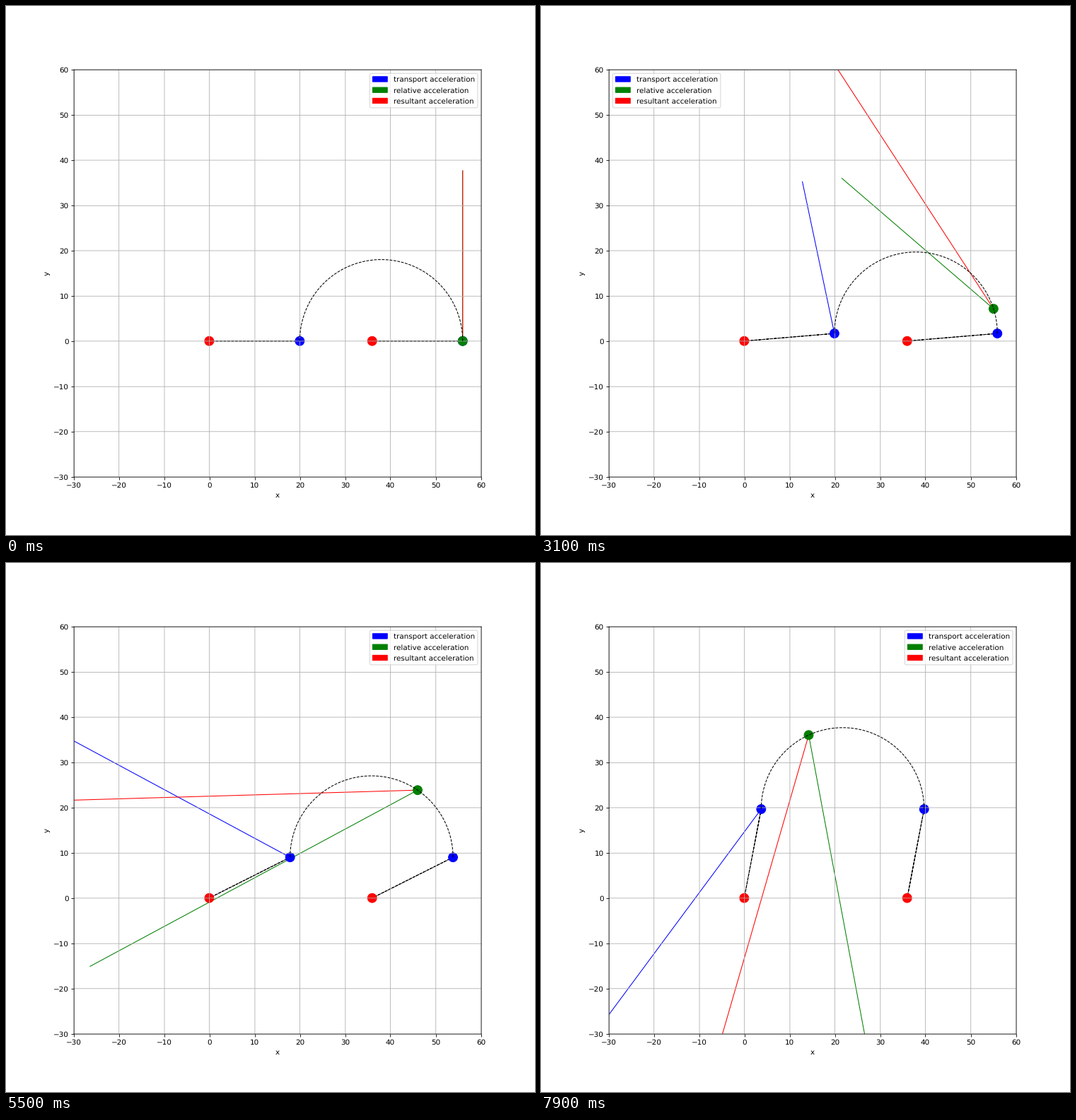
Recreate the animation shown at these times as a matplotlib script. Size 748 by 748 pixels, loop 8000 ms.

```python
import numpy as np
import matplotlib.pyplot as plt
from matplotlib.animation import FuncAnimation
from matplotlib.patches import Circle, Patch

plt.rcParams.update({"path.snap": False, "text.hinting": "none"})

CRANK, R, GAP = 20, 18, 36
FRAMES = 80
DT = np.sqrt(3) / 99

# Axes box in thousandths of the figure, measured from the top left
LEFT, BOTTOM, SIDE = 127.5, 890, 770
UNIT = SIDE / 90


def cell_center(v):
    return np.floor(v + 0.5 + 1e-6) + 0.5


# Grid lines sit on the cell centres of a 1000 by 1000 raster
ticks = np.arange(-30, 61, 10)
grid_x = (cell_center(LEFT + UNIT * (ticks + 30)) - LEFT) / UNIT - 30
grid_y = (BOTTOM - cell_center(BOTTOM - UNIT * (ticks + 30))) / UNIT - 30
names = [f"{v}".replace("-", "\u2212") for v in ticks]

fig = plt.figure(figsize=(10, 10), dpi=74.8)
ax = fig.add_axes([cell_center(LEFT) / 1000, 1 - cell_center(BOTTOM) / 1000,
                   SIDE / 1000, SIDE / 1000])
ax.set_xticks(grid_x, names)
ax.set_yticks(grid_y, names)
ax.set(xlim=grid_x[[0, -1]], ylim=grid_y[[0, -1]], xlabel="x", ylabel="y")
ax.grid(True)


def line(color, style="-", zorder=1):
    return ax.plot([], [], color=color, ls=style, lw=1, zorder=zorder,
                   solid_capstyle="butt")[0]


def dot(x, color):
    return ax.add_patch(Circle((x, 0), 1, color=color))


vectors = {
    "transport": line("blue"),
    "relative": line("green"),
    "resultant": line("red"),
}
cranks = [line("black", "--") for _ in range(2)]
arc = line("black", "--", zorder=2)
pivots = [dot(x, "red") for x in (0, GAP)]
pins = [dot(x, "blue") for x in (0, GAP)]
slider = dot(0, "green")
legend = ax.legend(
    handles=[Patch(color=v.get_color(), label=f"{name} acceleration")
             for name, v in vectors.items()],
    loc="upper right", labelspacing=0.54)
sweep = np.linspace(0, np.pi, 100)


def polar(angle):
    """Radial and tangential unit vectors."""
    c, s = np.cos(angle), np.sin(angle)
    return np.array([c, s]), np.array([-s, c])


def connect(artist, *points):
    artist.set_data(*np.transpose(points))


def legend_loc(i):
    """Keep the legend clear of the vectors' bounding boxes."""
    if i < 12 or i >= 49:
        return "upper right"
    return "upper left" if i < 37 else "lower left"


def update(i):
    t = i * DT

    # Crank angle pi t^3 / 6, arc length 6 pi t^2
    rad, tan = polar(np.pi * t**3 / 6)
    a = CRANK * rad
    transport = CRANK * (np.pi * t * tan - (np.pi * t**2 / 2) ** 2 * rad)

    rad, tan = polar(6 * np.pi * t**2 / R)
    mid = a + [R, 0]
    m = mid + R * rad
    relative = 12 * np.pi * tan - (12 * np.pi * t) ** 2 / R * rad

    connect(vectors["transport"], a, a + transport)
    connect(vectors["relative"], m, m + relative)
    connect(vectors["resultant"], m, m + transport + relative)

    # Each crank's dashes run out and back
    for crank, pin, x in zip(cranks, pins, (0, GAP)):
        pivot, end = np.array([x, 0]), a + [x, 0]
        connect(crank, end, pivot, end)
        pin.set_center(end)
    slider.set_center(m)
    arc.set_data(mid[0] + R * np.cos(sweep), mid[1] + R * np.sin(sweep))
    legend.set_loc(legend_loc(i))
    return []


anim = FuncAnimation(fig, update, frames=FRAMES, interval=100,
                     init_func=lambda: update(0), repeat=True, repeat_delay=0)
plt.show()
```
